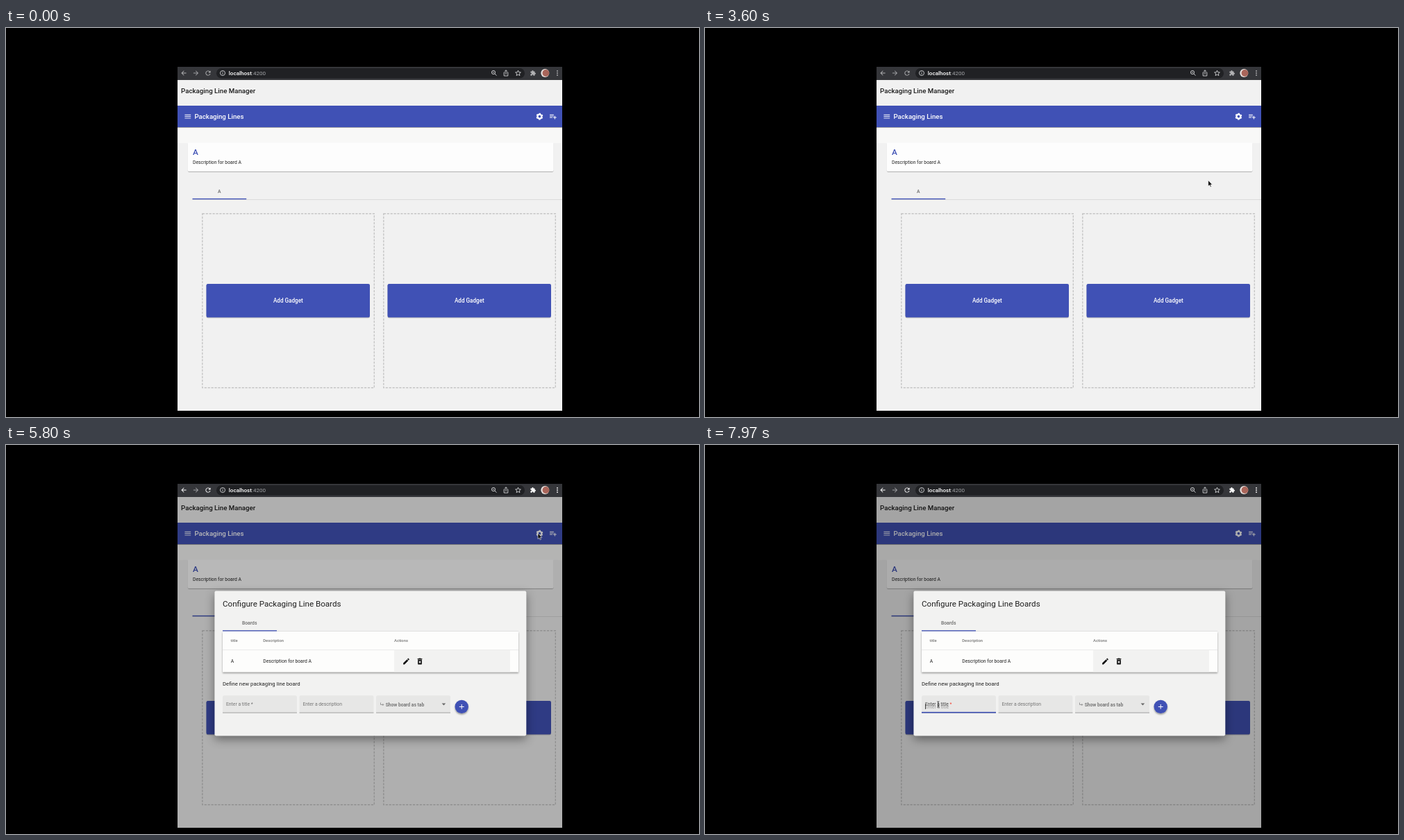
Animation, 998 px wide and 561 px high, one loop 8000 ms. Source, as an HTML page:

```html
<!DOCTYPE html>
<html lang="en">
<head>
<meta charset="utf-8">
<title>Packaging Line Manager</title>
<style>
  html, body { margin: 0; width: 100%; height: 100%; overflow: hidden; background: #000; }
  svg { display: block; width: 100%; height: 100%; font-family: Roboto, Arial, sans-serif; }
  text { white-space: pre; }
</style>
</head>
<body>
<svg id="stage" viewBox="0 0 998 561"></svg>
<script>
const LOOP = 8000, BLUE = '#3f51b5', PAGE = '#f1f1f1';
const ACTIVATE = 4450, RIPPLE = 5560, OPEN = 5653, FOCUS = 7940;
const ICON_SCALE = 0.487;

const ICONS = {
  menu: 'M3 18h18v-2H3zm0-5h18v-2H3zm0-7v2h18V6z',
  playlist: 'M14 10H2v2h12zm0-4H2v2h12zm4 8v-4h-2v4h-4v2h4v4h2v-4h4v-2zM2 16h8v-2H2z',
  edit: 'M3 17.25V21h3.75L17.81 9.94l-3.75-3.75zM20.71 7.04c.39-.39.39-1.02 0-1.41l-2.34-2.34c-.39-.39-1.02-.39-1.41 0l-1.83 1.83 3.75 3.75z',
  bin: 'M6 19c0 1.1.9 2 2 2h8c1.1 0 2-.9 2-2V7H6zm2.46-7.12l1.41-1.41L12 12.59l2.12-2.12 1.41 1.41L13.41 14l2.12 2.12-1.41 1.41L12 15.41l-2.12 2.12-1.41-1.41L10.59 14zM15.5 4l-1-1h-5l-1 1H5v2h14V4z',
  add: 'M19 13h-6v6h-2v-6H5v-2h6V5h2v6h6z',
  back: 'M20 11H7.8l5.6-5.6L12 4l-8 8 8 8 1.4-1.4L7.8 13H20z',
  forward: 'M4 11h12.2l-5.6-5.6L12 4l8 8-8 8-1.4-1.4 5.6-5.6H4z',
  reload: 'M17.65 6.35A8 8 0 1 0 19.7 14h-2.1A6 6 0 1 1 12 6c1.66 0 3.1.7 4.2 1.8L13 11h7V4z',
  puzzle: 'M20.5 11H19V7a2 2 0 0 0-2-2h-4V3.500a2.500 2.500 0 0 0-5 0V5H4a2 2 0 0 0-2 2v3.800h1.500a2.700 2.700 0 0 1 0 5.400H2V20a2 2 0 0 0 2 2h3.800v-1.500a2.700 2.700 0 0 1 5.400 0V22H17a2 2 0 0 0 2-2v-4h1.500a2.500 2.500 0 0 0 0-5z'
};

const rect = (x, y, w, h, fill, extra = '') =>
  `<rect x="${x}" y="${y}" width="${w}" height="${h}" fill="${fill}" ${extra}/>`;
const text = (s, x, y, size, fill, weight = 400, extra = '') =>
  `<text x="${x}" y="${y}" font-size="${size}" fill="${fill}" font-weight="${weight}" ${extra}>${s}</text>`;
const icon = (name, cx, cy, fill, scale = ICON_SCALE) =>
  `<path d="${ICONS[name]}" fill="${fill}" transform="translate(${cx} ${cy}) scale(${scale}) translate(-12 -12)"/>`;
const middle = 'text-anchor="middle"';

function toolbar() {
  const fine = 'fill="none" stroke="#d5d6d8"';
  return rect(247, 56, 554, 19, '#35363a') +
    rect(303, 58, 444, 14.5, '#202124', 'rx="7.2"') +
    `<g id="chrome">${icon('back', 256, 65, '#fff', .45)}
      ${icon('reload', 291, 65, '#fff', .45)}${icon('puzzle', 759, 65, '#fff', .37)}
      <g fill="#fff"><circle cx="794" cy="62" r=".9"/><circle cx="794" cy="65" r=".9"/><circle cx="794" cy="68" r=".9"/></g></g>` +
    icon('forward', 273.500, 65, '#a0a1a4', .45) +
    `<g ${fine} stroke-width=".9"><circle cx="312" cy="65" r="3.500"/><path d="M312 64.5v2.300M312 62.800v.9"/>
      <circle cx="702" cy="64" r="2.600"/><path d="M704 66l2.500 2.700M700.800 64h2.400"/>
      <path d="M718.400 64h-1.200v5h5.600v-5h-1.200M720 67v-6M718.200 62.500l1.800-1.800 1.800 1.800"/>
      <path d="M737.500 61.200l1.100 2.600 2.800.2-2.100 1.900.6 2.700-2.400-1.400-2.400 1.400.6-2.700-2.100-1.900 2.800-.2z"/></g>` +
    text('localhost<tspan fill="#a5a7aa" font-weight="400">:4200</tspan>', 320.800, 67.900, 8.050, '#fff', 500) +
    '<circle cx="776.300" cy="65" r="6" fill="#e9e2df"/><circle cx="777.400" cy="65" r="4.900" fill="#a9655a"/>';
}

function navbar() {
  return rect(247, 112, 554, 31, BLUE, 'filter="url(#low)"') +
    icon('menu', 261.800, 127.700, '#fff') +
    text('Packaging Lines', 271.500, 131, 9.650, '#fff', 500) +
    '<circle id="ripple" cx="768.200" cy="127.500" r="10" fill="#fff"/>' +
    `<g fill="none" stroke="#fff" transform="translate(768.400 127.600) rotate(13)">
      <circle r="2.900" stroke-width="2.200"/>
      <circle r="4.200" stroke-width="1.500" stroke-dasharray="2.300 2.098"/></g>` +
    icon('playlist', 787.900, 127.600, '#fff');
}

function gadget(x) {
  return rect(x, 267.800, 247.500, 251, 'none', 'stroke="#c6c6c6" stroke-width="1.400" stroke-dasharray="3.200 1.700"') +
    rect(x + 5.700, 369, 235.500, 48.300, BLUE, 'rx="2.200" filter="url(#low)"') +
    text('Add Gadget', x + 123.500, 395.800, 8.150, '#fff', 500, middle);
}

function page() {
  return rect(247, 75, 554, 477, PAGE) +
    rect(247, 143, 554, 23, '#f8f8f7') +
    text('Packaging Line Manager', 252, 93.600, 9.700, '#1c1c1c', 500) +
    navbar() +
    rect(261.700, 164, 526.800, 42.700, '#fdfdfd', 'rx="2" filter="url(#low)"') +
    rect(255, 155, 540, 10.500, '#f8f8f7') +
    text('A', 269, 182.600, 11.800, BLUE, 500) +
    text('Description for board A', 269, 196, 6.800, '#222') +
    text('A', 307.300, 237.500, 6.800, '#6b6b6b', 500, middle) +
    rect(268.500, 247, 532.500, .8, '#d6d6d6') +
    rect(268.500, 245.800, 77.700, 1.400, BLUE) +
    gadget(282.800) + gadget(543.800);
}

function field(x, id) {
  return `<path d="M${x} 386v-22.500q0-2.200 2.200-2.200h102.600q2.200 0 2.200 2.200v22.500z" fill="#e7e7e6"/>` +
    rect(x, 385.700, 107, .8, '#8c8c8c', id ? `id="${id}"` : '');
}

function dialog() {
  const head = (s, x) => text(s, x, 284, 5.850, '#757575', 500);
  return `<g id="dialog">` +
    rect(300.500, 210.500, 448.700, 208.800, '#f2f2f1', 'rx="2" filter="url(#high)"') +
    text('Configure Packaging Line Boards', 312, 233.300, 11.600, '#1f1f1f') +
    rect(312, 245, 78, 23, '#e5e6ec', 'id="tabFocus"') +
    text('Boards', 350.700, 258.600, 6.800, '#333', 500, 'id="tabText" ' + middle) +
    rect(312, 269, 426, 58.300, '#fdfdfc', 'filter="url(#mid)"') +
    rect(312, 268, 426, .8, '#dcdcdc') +
    rect(312, 267.200, 78, 1.300, BLUE) +
    head('title', 323.600) + head('Description', 370.200) + head('Actions', 559) +
    rect(312, 295, 426, .7, '#e2e2e2') +
    rect(559, 295.800, 167, 31.500, '#f2f2f1') +
    text('A', 323.700, 313.800, 6.800, '#222') +
    text('Description for board A', 370.200, 313.800, 6.800, '#222') +
    icon('edit', 576.500, 312, '#111') + icon('bin', 596, 312, '#111') +
    text('Define new packaging line board', 312, 346.600, 7.780, '#222') +
    field(312) + field(422.500) + field(533) +
    rect(312, 384.900, 107, 1.600, BLUE, 'id="underline"') +
    text('Enter a title', 317, 379.500, 6.800, '#9a9a9a', 400, 'id="hint"') +
    '<g id="label">' + text('Enter a title <tspan id="star">*</tspan>', 0, 0, 6.800, 'inherit') + '</g>' +
    rect(317, 373.500, .8, 7.500, '#222', 'id="caret"') +
    text('Enter a description', 427.500, 376.400, 6.800, '#757575') +
    '<path d="M539.500 371.500v3h4M542.300 373l1.500 1.500-1.500 1.500" fill="none" stroke="#777" stroke-width=".7"/>' +
    text('Show board as tab', 546.700, 376.700, 6.700, '#666', 500) +
    '<path d="M627.600 372.600h5.600l-2.800 2.800z" fill="#666"/>' +
    `<circle cx="656.200" cy="377.400" r="9.700" fill="${BLUE}" filter="url(#mid)"/>` +
    icon('add', 656.200, 377.400, '#fff') + '</g>';
}

function pointers() {
  return `<g id="cursor">
    <path id="arrow" d="M0 0v8.300l1.900-1.700 1.300 2.900 1.300-.6-1.300-2.800h2.600z" fill="#000" stroke="#fff" stroke-width=".6"/>
    <path id="hand" d="M1.200 1.200q.8-.9 1.600 0v2.200l3 .7q.8.3.7 1.200l-.6 3.400h-3.500L-.3 5.800q.2-1 1.500-.2z" fill="#fff" stroke="#000" stroke-width=".7"/>
    <path id="beam" d="M-1.500-4.200q1.500 0 1.500 1v6.400q0 1-1.500 1M1.500-4.200q-1.500 0-1.500 1M0 3.200q0 1 1.500 1M-.8 1.500h1.600" fill="none" stroke="#222" stroke-width=".8"/>
  </g>`;
}

const shadow = (id, dy, blur, alpha) =>
  `<filter id="${id}" x="-20%" y="-30%" width="140%" height="170%"><feDropShadow dx="0" dy="${dy}" stdDeviation="${blur}" flood-opacity="${alpha}"/></filter>`;

document.getElementById('stage').innerHTML =
  `<defs>${shadow('low', 1, .7, .32)}${shadow('mid', 1.700, 1.200, .4)}${shadow('high', 5, 7, .42)}
    <clipPath id="window"><rect x="247" y="56" width="554" height="496"/></clipPath></defs>
  <g clip-path="url(#window)">${page()}${rect(247, 75, 554, 477, '#000', 'id="shade"')}${toolbar()}${dialog()}${pointers()}</g>`;

const $ = id => document.getElementById(id);
const set = (id, name, value) => $(id).setAttribute(name, value);
const show = (id, on) => set(id, 'visibility', on ? 'inherit' : 'hidden');
const clamp = v => Math.max(0, Math.min(1, v));
const mix = (a, b, k) => a + (b - a) * k;
const smooth = k => k * k * (3 - 2 * k);

function bezier(x1, y1, x2, y2) {
  const at = (a, b, u) => 3 * a * u * (1 - u) ** 2 + 3 * b * u * u * (1 - u) + u ** 3;
  return x => {
    let lo = 0, hi = 1;
    for (let i = 0; i < 24; i++) {
      const m = (lo + hi) / 2;
      if (at(x1, x2, m) < x) lo = m; else hi = m;
    }
    return x <= 0 ? 0 : x >= 1 ? 1 : at(y1, y2, lo);
  };
}
const decelerate = bezier(0, 0, .2, 1);
const swift = bezier(.25, .8, .25, 1);

// time, x, y of the pointer's hot spot
const track = [
  [2400, 692, 322], [2640, 699, 278], [3200, 699, 278], [4150, 766, 126.500],
  [6150, 766, 127.300], [6850, 445, 280], [7150, 445, 280], [7780, 335.800, 374]
];

function pointerAt(t) {
  const i = track.findIndex(p => p[0] > t);
  if (i < 0) return track[track.length - 1].slice(1);
  if (i === 0) return track[0].slice(1);
  const a = track[i - 1], b = track[i];
  const k = smooth((t - a[0]) / (b[0] - a[0]));
  return [mix(a[1], b[1], k), mix(a[2], b[2], k)];
}

function render(t) {
  set('chrome', 'opacity', t < ACTIVATE ? .62 : 1);
  set('ripple', 'opacity', .17 * clamp((t - RIPPLE) / 70) * clamp((5790 - t) / 100));

  const grow = decelerate(clamp((t - OPEN) / 150));
  const scale = mix(.7, 1, grow);
  show('dialog', t >= OPEN);
  set('dialog', 'opacity', grow);
  set('dialog', 'transform', `translate(525 315) scale(${scale}) translate(-525 -315)`);
  set('shade', 'opacity', .32 * swift(clamp((t - OPEN) / 400)));

  const focused = t >= FOCUS, tabOn = t >= 5830 && !focused;
  show('tabFocus', tabOn);
  set('tabText', 'opacity', tabOn ? 1 : .7);
  ['underline', 'hint', 'caret'].forEach(id => show(id, focused));
  const lift = swift(clamp((t - FOCUS - 25) / 400));
  set('label', 'transform', `translate(317 ${376.4 - 7 * lift}) scale(${1 - .25 * lift})`);
  set('label', 'fill', focused ? '#444' : '#757575');
  set('star', 'fill', focused ? '#f44336' : '#757575');

  const [x, y] = pointerAt(t);
  const inField = t > 7000 && x < 419 && y > 361;
  const onGear = t >= ACTIVATE && t < OPEN;
  show('cursor', t >= track[0][0]);
  set('cursor', 'transform', `translate(${x} ${y})`);
  show('arrow', !inField && !onGear);
  show('hand', onGear);
  show('beam', inField);
}

const start = performance.now();
function tick() {
  render((performance.now() - start) % LOOP);
  requestAnimationFrame(tick);
}
tick();
</script>
</body>
</html>
```
